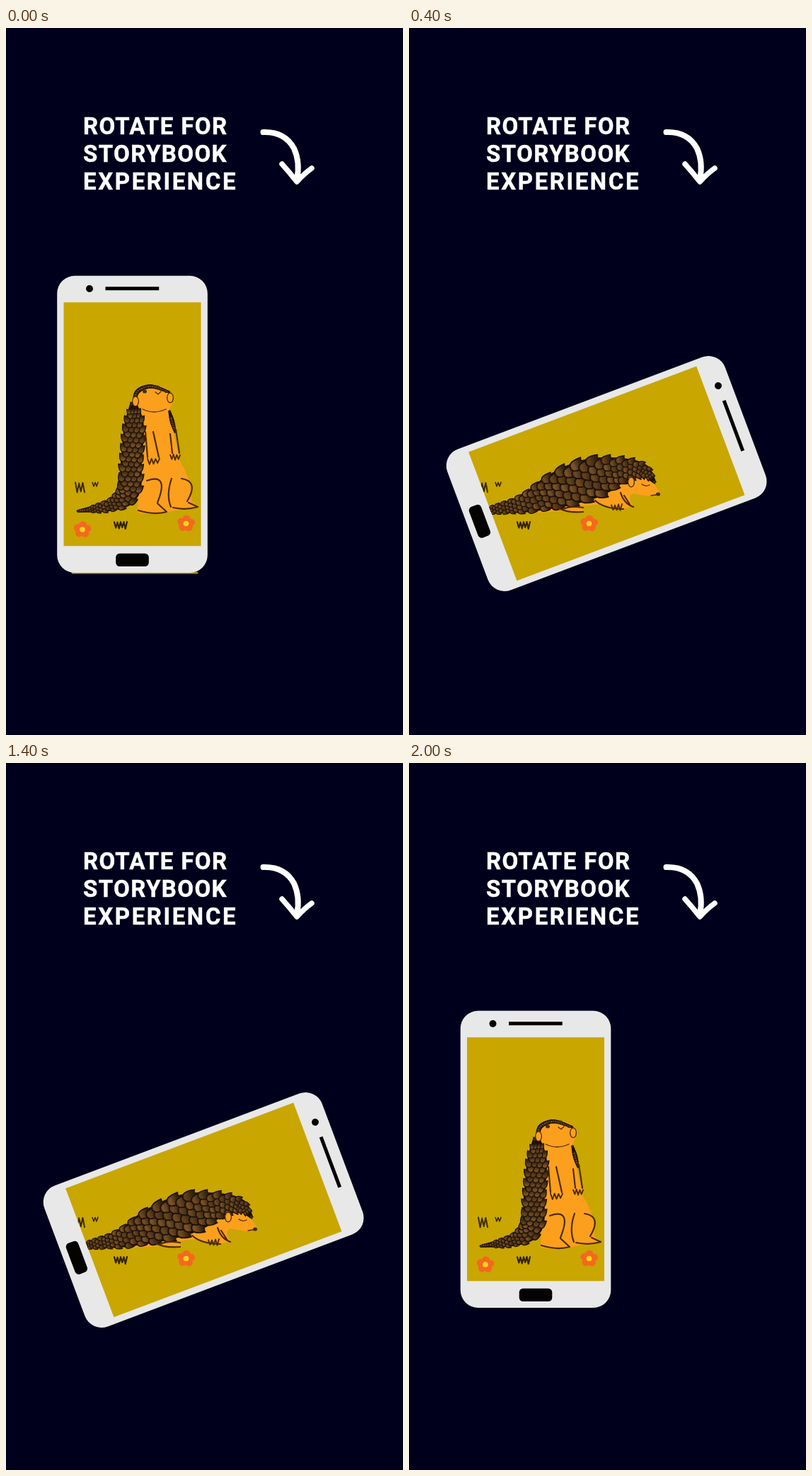
These frames come from a looping animation (561 by 998 pixels, 2.13 s). An HTML page with a canvas:

```html
<!DOCTYPE html>
<html lang="en">
<head>
<meta charset="utf-8">
<title>Rotate for storybook experience</title>
<style>
  html, body { margin: 0; width: 100%; height: 100%; overflow: hidden; background: #00001d; }
  canvas, svg { position: absolute; left: 0; top: 0; display: block; }
  text { font: 700 33px Roboto, "Open Sans", sans-serif; fill: #fff; stroke: #fff; stroke-width: .5px; letter-spacing: 1.4px; }
</style>
</head>
<body>
<canvas id="stage" width="561" height="998"></canvas>
<svg width="561" height="998">
  <text x="109" y="150">ROTATE FOR</text>
  <text x="109" y="189">STORYBOOK</text>
  <text x="109" y="228" style="letter-spacing: 2.6px">EXPERIENCE</text>
</svg>
<script>
const ctx = document.getElementById('stage').getContext('2d');
const LOOP = 2130;
const NAVY = '#00001d', GOLD = '#c9a600', SHELL = '#e8e8e8', INK = '#050302';
const ORANGE = '#fb9f1d', LINE = '#4d2c0b', DARK = '#1d120a';

const steps = [
  { at: 0, pose: 'stand', edge: 'M94 769H270' },
  { at: 200, pose: 'sit', edge: 'M271 749L263 771L252 786' },
  { at: 400, pose: 'walk' },
  { at: 600, pose: 'curl' },
  { at: 1400, pose: 'walk', dy: 2 },
  { at: 1600, pose: 'sit' },
  { at: 1800, pose: 'stand', dx: .5 }
];

// phone: centre and angle; bands: spine points [x, y, width] from head to tail
const poses = {
  stand: {
    phone: [178.5, 559.5, 0],
    body: 'M178 530Q180 506 206 505Q234 506 235 520Q236 534 229 541Q239 580 246 612Q263 638 262 668L272 676Q236 681 228 684Q205 688 186 684L189 545Z',
    lines: 'M197 570L200 606M208 570L216 606M240 567L245 600M232 573L235 600M199 639Q231 628 214 670M234 636Q226 659 233 676M248 636Q273 640 256 668M187 681Q210 688 227 683L214 671M236 677Q254 681 271 676L258 670',
    fine: 'M193 538Q209 546 226 538M211 514L215 517L219 513',
    ears: [[183, 527], [232, 522]],
    dots: [[196, 513, 3], [214, 507, 3], [226, 513, 2.5]],
    claws: [[200, 607, 17], [232, 601, 14]],
    bands: [
      [[180, 530, 8], [181, 560, 26], [177, 610, 28], [173, 655, 29], [146, 674, 15], [101, 682, 2]],
      [[181, 530, 4], [186, 513, 5], [205, 506, 4], [231, 514, 2]],
      [[231, 541, 2], [235, 556, 5], [239, 571, 1]]
    ]
  },
  sit: {
    phone: [240.8, 572, 26.5],
    body: 'M258 560Q280 541 304 543L326 546Q331 556 303 579Q289 592 306 629L292 634L290 646L276 650Q270 660 281 677L243 678L240 685L180 685Q230 640 258 560Z',
    lines: 'M294 597L306 630Q296 635 284 628M283 610L291 626M246 652Q262 640 277 641M250 660Q272 644 281 677Q262 680 243 675M231 653Q246 660 242 667Q229 672 240 684',
    fine: 'M319 558L322 560L325 557',
    ears: [[282, 568]],
    dots: [[325, 549, 3], [300, 555, 4]],
    claws: [[278, 641, 15]],
    bands: [[[304, 544, 3], [275, 550, 13], [252, 579, 34], [224, 614, 50], [192, 645, 46], [155, 671, 22], [96, 683, 2]]]
  },
  walk: {
    phone: [279, 629, 69.4],
    body: 'M180 672L318 630Q342 632 355 657Q350 665 318 657Q307 660 317 675L303 679L270 672L244 675L246 682L214 682L180 684Z',
    lines: 'M263 667Q276 679 303 679M299 656Q304 672 317 676M304 660L313 674M211 678Q226 685 246 683M218 679Q229 674 246 677',
    fine: 'M329 644Q334 648 340 645M342 660L349 659',
    ears: [[314, 641]],
    dots: [[352, 658, 3]],
    claws: [[286, 672, 15]],
    bands: [[[347, 641, 3], [331, 625, 18], [302, 624, 33], [268, 633, 53], [235, 643, 55], [200, 656, 45], [160, 672, 23], [95, 684, 2]]]
  },
  curl: {
    phone: [289, 640.3, 90],
    body: 'M214 640Q280 626 325 636Q346 645 348 668Q339 684 326 673Q312 667 302 669L300 678L270 674Q272 690 255 690L214 666Z',
    lines: 'M253 650Q263 654 258 663L249 665M263 651Q257 660 263 669Q273 670 271 682M275 654L279 670M300 653L301 670M290 657L291 670',
    fine: 'M328 651Q332 659 336 655M327 657L336 658',
    ears: [[317, 640]],
    dots: [[336, 673, 4.5]],
    claws: [[279, 670, 22]],
    bands: [[[346, 658, 3], [316, 626, 20], [262, 619, 27], [215, 627, 34], [196, 652, 38], [207, 677, 30], [235, 689, 14], [268, 693, 2]]]
  }
};

const noise = n => { const s = Math.sin(n * 127.1) * 43758.5; return s - Math.floor(s); };
const clamp = (v, lo, hi) => Math.max(lo, Math.min(hi, v));

// Catmull-Rom point at t in 0..1
function curve(pts, t) {
  const last = pts.length - 1;
  const i = Math.min(last - 1, Math.floor(t * last)), f = t * last - i;
  const [p, q, r, s] = [-1, 0, 1, 2].map(k => pts[clamp(i + k, 0, last)]);
  return q.map((b, n) => {
    const a = p[n], c = r[n], d = s[n];
    return b + f * (c - a + f * (2 * a - 5 * b + 4 * c - d + f * (3 * (b - c) + d - a))) / 2;
  });
}

function stroke(path, color, width) {
  ctx.strokeStyle = color;
  ctx.lineWidth = width;
  ctx.stroke(typeof path === 'string' ? new Path2D(path) : path);
}

function dot(x, y, rx, ry, color) {
  ctx.fillStyle = color;
  ctx.beginPath();
  ctx.ellipse(x, y, rx, ry, 0, 0, 7);
  ctx.fill();
}

function box(x, y, w, h, r, color) {
  ctx.fillStyle = color;
  ctx.beginPath();
  ctx.roundRect(x, y, w, h, r);
  ctx.fill();
}

// hand-drawn zigzag
function scribble(x, y, w, h, n, color, width) {
  const path = new Path2D();
  for (let k = 0; k <= n; k++) path.lineTo(x + w * k / n, y + (k % 2 ? h : 0) + noise(x + k) * 2);
  stroke(path, color, width);
}

// spine frame: point, width, direction to the tail and speed along the curve
function frame(spine, u) {
  const a = curve(spine, clamp(u - .01, 0, 1)), b = curve(spine, clamp(u + .01, 0, 1));
  const [x, y, w] = curve(spine, u);
  return { x, y, w, angle: Math.atan2(b[1] - a[1], b[0] - a[0]), speed: Math.hypot(b[0] - a[0], b[1] - a[1]) / .02 };
}

function scale(s, seed) {
  const light = noise(seed);
  const g = ctx.createLinearGradient(-s * .5, 0, s, 0);
  g.addColorStop(0, '#2b1a0c');
  g.addColorStop(.65, `rgb(${94 + light * 34},${62 + light * 24},${28 + light * 12})`);
  g.addColorStop(1, '#553619');
  ctx.fillStyle = g;
  const shape = new Path2D(`M${-s * .6} ${-s * .55}C${s * .6} ${-s * .65} ${s * .8} ${-s * .3} ${s * .8} 0S${s * .6} ${s * .65} ${-s * .6} ${s * .55}`);
  ctx.fill(shape);
  stroke(shape, DARK, .6 + s * .09);
}

// overlapping scales, laid from tail to head
function band(spine) {
  const stops = [];
  for (let u = 0; u < 1;) {
    const f = frame(spine, u);
    f.size = clamp(3 + f.w * .2, 3.4, 14);
    stops.push(f);
    u += .8 * f.size / f.speed;
  }
  const side = sign => stops.map(f => [f.x - Math.sin(f.angle) * f.w / 2 * sign, f.y + Math.cos(f.angle) * f.w / 2 * sign]);
  const base = new Path2D();
  [...side(1), spine.at(-1), ...side(-1).reverse()].forEach(p => base.lineTo(p[0], p[1]));
  base.closePath();
  ctx.fillStyle = DARK;
  ctx.fill(base);
  stroke(base, DARK, 1.5);

  for (let i = stops.length - 1; i >= 0; i--) {
    const f = stops[i], n = Math.max(1, Math.round(f.w / f.size)), odd = n > 1 ? i % 2 : 0;
    for (let j = 0; j < n + odd; j++) {
      ctx.save();
      ctx.translate(f.x, f.y);
      ctx.rotate(f.angle);
      ctx.translate(0, ((j + (odd ? 0 : .5)) / n - .5) * f.w * .86);
      ctx.rotate((noise(i * 13 + j) - .5) * .35);
      scale(Math.min(f.size, f.w / n), i * 17 + j);
      ctx.restore();
    }
  }
}

function animal(pose) {
  ctx.fillStyle = ORANGE;
  ctx.fill(new Path2D(pose.body));
  pose.bands.forEach(band);
  stroke(pose.lines, LINE, 2.2);
  stroke(pose.fine, LINE, 1.3);
  for (const [x, y] of pose.ears) {
    dot(x, y, 5, 7.5, LINE);
    dot(x, y, 3.7, 6.2, ORANGE);
  }
  for (const [x, y, w] of pose.claws) scribble(x, y, w, 7, 6, LINE, 1.9);
  for (const [x, y, r] of pose.dots) dot(x, y, r, r * .85, '#40301f');
}

function flower(x, y) {
  for (let k = 0; k < 5; k++) {
    const a = k * Math.PI * .4 - 1.5;
    dot(x + 7.2 * Math.cos(a), y + 6.6 * Math.sin(a), 5.5, 5.2, '#f5681f');
  }
  dot(x, y, 3.8, 3.8, '#ffd51c');
}

function meadow() {
  scribble(98, 641, 13, 13, 5, '#3c2b05', 2);
  scribble(122, 641, 8, 5, 4, '#3c2b05', 1.6);
  scribble(153, 697, 18, 8, 8, '#33230a', 2.2);
  flower(108, 708);
  flower(254.5, 699.5);
}

function arrow() {
  stroke('M363.500 147Q394 146 407 170Q416 190 411 213', '#fff', 8);
  stroke('M390 192Q400 203 411 217Q422 205 432 198', '#fff', 7.5);
}

function draw({ pose, edge, dx = 0, dy = 0 }) {
  const art = poses[pose], [x, y, turn] = art.phone;
  ctx.lineCap = ctx.lineJoin = 'round';
  ctx.fillStyle = NAVY;
  ctx.fillRect(0, 0, 561, 998);
  arrow();
  if (edge) stroke(edge, '#ad8f12', 3);

  ctx.save();
  ctx.translate(x + dx, y + dy);
  ctx.rotate(turn * Math.PI / 180);
  box(-106.3, -209.7, 212.6, 419.2, 25, SHELL);
  dot(-60.5, -191.5, 5, 5, INK);
  box(-38, -194.2, 75.7, 5, 0, INK);
  box(-23.3, 182.2, 46.6, 18.3, 5.5, INK);
  box(-97, -172.3, 194, 344, 0, GOLD);
  ctx.clip();
  // the scene stays upright while the screen turns around it
  ctx.resetTransform();
  meadow();
  animal(art);
  ctx.restore();
}

const start = performance.now();
let shown;
function tick() {
  const t = (performance.now() - start) % LOOP;
  const step = steps.filter(s => s.at <= t).pop();
  if (step !== shown) draw(shown = step);
  requestAnimationFrame(tick);
}
tick();
</script>
</body>
</html>
```
